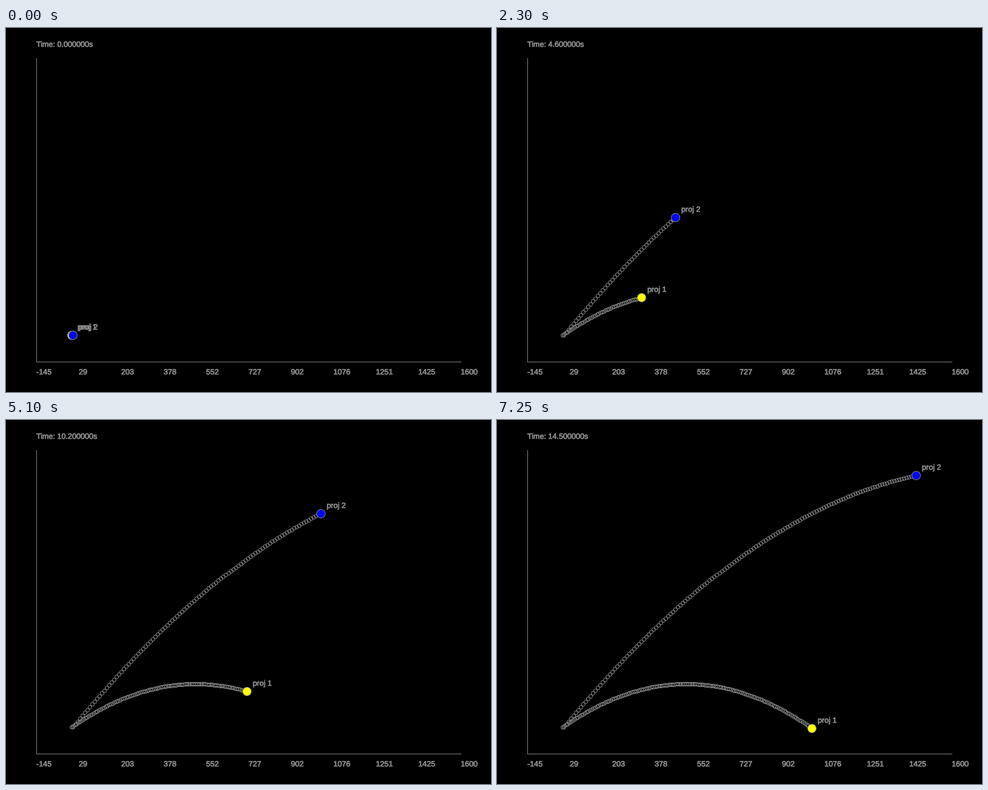
A matplotlib script that plays this animation: 800x600 px, repeating every 7300 ms.

```python
import numpy as np
import matplotlib.pyplot as plt
from matplotlib import patheffects
from matplotlib.animation import FuncAnimation
from matplotlib.patches import Circle, PathPatch
from matplotlib.path import Path

W, H, DPI = 800, 600, 100
FRAMES, INTERVAL, DT = 146, 50, 0.1
PX = 72 / DPI  # points per pixel
GREY, TEXT = "#808080", "#8a8a8a"
GRAVITY = 9.81
SCALE_X, SCALE_Y = 0.40104, 0.2805  # pixels per metre
X0, Y0 = 108.33, 506.85  # launch point in pixels

fig = plt.figure(figsize=(W / DPI, H / DPI), dpi=DPI, facecolor="black")
ax = fig.add_axes([0, 0, 1, 1])
ax.set_xlim(0, W)
ax.set_ylim(H, 0)
ax.axis("off")


def label(x, y, text, z=5):
    t = ax.text(x, y + 1, text, color=TEXT, family="Liberation Sans",
                fontsize=12.6 * PX, va="baseline", ha="left", zorder=z)
    t.set_path_effects([patheffects.withStroke(linewidth=0.7 * PX,
                                               foreground=TEXT)])
    return t


def line(xs, ys):
    ax.plot(xs, ys, color=GREY, lw=PX, snap=False,
            solid_capstyle="butt", zorder=1)


UNIT = Path.unit_circle()


def rings(points, r=3):
    """One path holding a circle around every point."""
    verts = (points[:, None, :] + r * UNIT.vertices[None]).reshape(-1, 2)
    return Path(verts, np.tile(UNIT.codes, len(points)))


class Projectile:
    def __init__(self, name, color, start, speed, angle, z):
        t = np.arange(FRAMES) * DT
        a = np.radians(angle)
        x = start + speed * np.cos(a) * t
        y = speed * np.sin(a) * t - GRAVITY * t ** 2 / 2
        self.pos = np.floor(np.column_stack([X0 + SCALE_X * x,
                                             Y0 - SCALE_Y * y]))
        self.trail = ax.add_patch(PathPatch(
            rings(self.pos[:1] + 0.5), fill=False, ec=GREY, lw=PX,
            snap=False, zorder=2))
        self.ball = ax.add_patch(Circle((0, 0), 7, fc=color, ec=GREY,
                                        lw=PX, snap=False, zorder=z))
        self.tag = label(0, 0, name, z + 0.5)

    def show(self, i):
        x, y = self.pos[i]
        self.trail.set_path(rings(self.pos[:i + 1] + 0.5))
        self.ball.center = (x + 0.5, y + 0.5)
        self.tag.set_position((x + 10, y - 9))


line([50.5, 50.5], [50, 551])
line([50, 751], [550.5, 550.5])
ticks = [-145, 29, 203, 378, 552, 727, 902, 1076, 1251, 1425, 1600]
for k, value in enumerate(ticks):
    label(50 + 70 * k, 570, str(value))

clock = label(50, 30, "")
projectiles = [
    Projectile("proj 1", "#ffff00", 0, 100, 45, 3),
    Projectile("proj 2", "#0000ff", 5, 200, 60, 4),
]


def update(i):
    clock.set_text(f"Time: {i * DT:.6f}s")
    for p in projectiles:
        p.show(i)
    return []


anim = FuncAnimation(fig, update, frames=FRAMES, interval=INTERVAL,
                     repeat=True, repeat_delay=0, blit=False)
plt.show()
```
